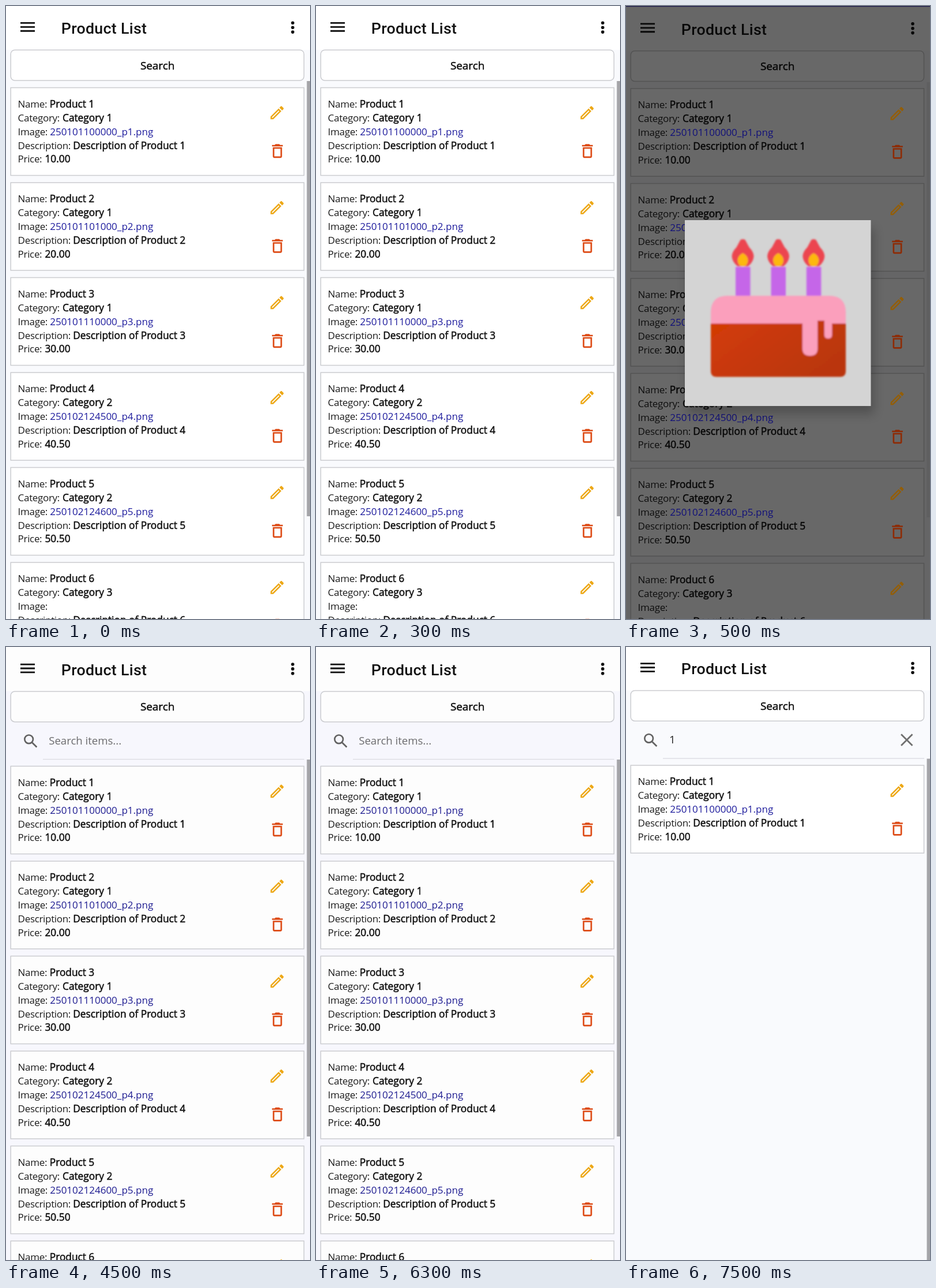
An HTML page that plays this animation: 527x1062 px, repeating every 8 s.

```html
<!DOCTYPE html>
<html lang="en">
<head>
<meta charset="utf-8">
<title>Product List</title>
<style>
  html, body { margin: 0; width: 100%; height: 100%; overflow: hidden; background: #fff; }
  svg { display: block; width: 100%; height: 100%; }
  text { font-family: "Open Sans", "Noto Sans", sans-serif; font-size: 17px; white-space: pre; }
  .label { letter-spacing: -.32px; }
  .value { font-size: 17.3px; stroke-width: .55px; stroke-linejoin: round; }
  .title { font: 500 26.7px Roboto, sans-serif; letter-spacing: .33px; }
  .big { font-size: 18.9px; }
  .hint { font-size: 18.6px; }
</style>
</head>
<body>
<svg id="stage" viewBox="0 0 527 1062" xmlns="http://www.w3.org/2000/svg">
  <defs>
    <path id="menu" d="M3 18h18v-2H3zm0-5h18v-2H3zm0-7v2h18V6z"/>
    <path id="edit" d="M14.06 9.02l.92.92L5.92 19H5v-.92l9.06-9.06M17.66 3c-.25 0-.51.1-.7.29l-1.83 1.83 3.75 3.75 1.83-1.83c.39-.39.39-1.02 0-1.41l-2.34-2.34c-.2-.2-.45-.29-.71-.29zm-3.6 3.19L3 17.25V21h3.75L17.81 9.94z"/>
    <path id="trash" d="M6 19c0 1.1.9 2 2 2h8c1.1 0 2-.9 2-2V7H6zM8 9h8v10H8zm7.5-5l-1-1h-5l-1 1H5v2h14V4z"/>
    <g id="lens" fill="none" stroke-width="2">
      <circle cx="9.5" cy="9.5" r="5.5"/>
      <path d="M13.9 13.9L19.8 19.8"/>
    </g>
    <g id="candle">
      <rect x="-12.5" y="452" width="25.5" height="51" fill="#c566e8"/>
      <path transform="translate(0 404)" fill="#ec4450" d="M-4 1Q0-1 4 1L11 14Q19 22 19 30Q18 40 9 47H-9Q-18 40-19 30Q-19 22-11 14Z"/>
      <path fill="#fdb80f" d="M0 428Q9 433 9 441Q8 451 0 451Q-8 451-9 441Q-9 433 0 428Z"/>
    </g>
    <linearGradient id="sponge" x1="0" y1="0" x2="1" y2=".6">
      <stop offset="0" stop-color="#d43b05"/>
      <stop offset="1" stop-color="#ba360d"/>
    </linearGradient>
    <filter id="soft"><feGaussianBlur stdDeviation="1.7"/></filter>
    <filter id="shade" x="-20%" y="-20%" width="140%" height="140%"><feGaussianBlur stdDeviation="9"/></filter>
  </defs>
  <g id="view"></g>
</svg>
<script>
const LOOP = 8000;
const view = document.getElementById('view');

// number, category, image, price
const products = [
  [1, 1, '250101100000_p1.png', '10.00'],
  [2, 1, '250101101000_p2.png', '20.00'],
  [3, 1, '250101110000_p3.png', '30.00'],
  [4, 2, '250102124500_p4.png', '40.50'],
  [5, 2, '250102124600_p5.png', '50.50'],
  [6, 3, '', '60.00']
];

const light = {
  head: '#fff', page: '#f9fafd', card: '#fff', edge: '#cbccd0', ink: '#111', label: '#1c1c1c',
  link: '#1c1a9c', edit: '#eda817', trash: '#dd4a14', bar: '#a5a5a9'
};
const tinted = { ...light, head: '#fdfdfd', page: '#f7f7fd', card: '#fdfdfd', link: '#1c1a90' };
const dimmed = {
  head: '#676767', page: '#656566', card: '#686868', edge: '#535353', ink: '#080808', label: '#0e0e0e',
  link: '#11107a', edit: '#935e08', trash: '#8e2b05', bar: '#5f5f60'
};

// dy: shift of the whole page, list: top of the first card
const scenes = [
  { at: 0, dy: 0, list: 141.5, bar: [130, 884], look: light },
  { at: 500, dy: 1.5, list: 143, bar: [132, 886], look: dimmed, modal: true },
  { at: 4500, dy: .7, list: 206.5, bar: [195, 848], look: tinted, search: '' },
  { at: 7500, dy: -.8, list: 205, bar: [193.5, 1062], look: light, search: '1' }
];

const rect = (x, y, w, h, fill, more = '') =>
  `<rect x="${x}" y="${y}" width="${w}" height="${h}" fill="${fill}" ${more}/>`;
const text = (x, y, cls, fill, str, more = '') =>
  `<text x="${x}" y="${y}" class="${cls}" fill="${fill}" ${more}>${str}</text>`;
const icon = (id, cx, cy, scale, fill) =>
  `<use href="#${id}" fill="${fill}" transform="translate(${cx} ${cy}) scale(${scale}) translate(-12 -12)"/>`;
const bold = (x, y, cls, c, str, more = '') =>
  text(x, y, 'value ' + cls, c.ink, str, `stroke="${c.ink}" ${more}`);

function header(c) {
  const dots = [29.3, 37.2, 45.1].map(y => `<circle cx="497" cy="${y}" r="2.8" fill="${c.ink}"/>`).join('');
  return rect(0, -4, 527, 80, c.head) +
    icon('menu', 37.5, 36.3, 1.39, c.ink) + dots +
    text(95.8, 48, 'title', c.ink, 'Product List') +
    rect(8.2, 76.2, 508.3, 52.8, c.card, `rx="7" stroke="${c.edge}" stroke-width="1.5"`) +
    bold(262.6, 109.7, 'big', c, 'Search', 'text-anchor="middle"');
}

function searchBar(query) {
  const lens = '<use href="#lens" stroke="#626262" transform="translate(27 146.5) scale(1.33)"/>';
  const cross = '<path d="M477 152L496.5 171.5M496.5 152L477 171.5" stroke="#707070" stroke-width="2.8"/>';
  return lens + rect(64, 193.2, 453, 1.3, '#dbdbe1') +
    (query ? text(75, 168.3, 'hint', '#222', query) + cross
           : text(74.2, 168.3, 'hint', '#6c6c6e', 'Search items...'));
}

function card([n, cat, image, price], y, c) {
  const rows = [
    ['Name:', 75.8, 'Product ' + n],
    ['Category:', 98, 'Category ' + cat],
    ['Image:', 76.2, image],
    ['Description:', 116.2, 'Description of Product ' + n],
    ['Price:', 67.4, price]
  ];
  const lines = rows.map(([label, x, value], i) => {
    const base = y + 34.3 + i * 23.9;
    return text(20.6, base, 'label', c.label, label) +
      (i === 2 ? text(x, base, 'link', c.link, value) : bold(x, base, '', c, value));
  });
  return rect(8.2, y, 508.3, 152, c.card, `stroke="${c.edge}" stroke-width="1.5"`) + lines.join('') +
    icon('edit', 470, y + 43.4, 1.27, c.edit) + icon('trash', 470.5, y + 109.8, 1.33, c.trash);
}

function cake() {
  const candles = [202.5, 264, 325.3].map(x => `<use href="#candle" x="${x}"/>`).join('');
  return rect(106, 385, 324, 322, '#000', 'opacity=".22" filter="url(#shade)"') +
    rect(102, 371, 322.5, 322, '#d4d4d4') +
    `<g filter="url(#soft)">${candles}
      <path fill="url(#sponge)" d="M147 540H381V633Q381 642.5 371 642.5H157Q147 642.5 147 633Z"/>
      <path fill="#fb9fbc" d="M147 550V531Q147 502 176 502H352Q381 502 381 531V550H357V570Q357 576 350.5 576Q344 576 344 570V545H332V594Q332 606 319 606Q306 606 306 594V550Z"/>
    </g>`;
}

function draw(s) {
  const c = s.look;
  const shown = s.search ? products.filter(p => String(p[0]).includes(s.search)) : products;
  const [top, end] = s.bar;
  return rect(0, 0, 527, 1062, c.page) +
    `<g transform="translate(0 ${s.dy})">${header(c)}${s.search === undefined ? '' : searchBar(s.search)}</g>` +
    shown.map((p, i) => card(p, s.list + i * 164.5, c)).join('') +
    rect(521.5, top, 5.5, end - top, c.bar) +
    (s.modal ? rect(0, 0, 527, 1.3, '#1c1a4c') + cake() : '');
}

let current;
function update(ms) {
  const t = ms % LOOP;
  const scene = scenes.filter(s => s.at <= t).pop();
  if (scene !== current) {
    current = scene;
    view.innerHTML = draw(scene);
  }
}

const start = performance.now();
function tick() {
  update(performance.now() - start);
  requestAnimationFrame(tick);
}
tick();
</script>
</body>
</html>
```
